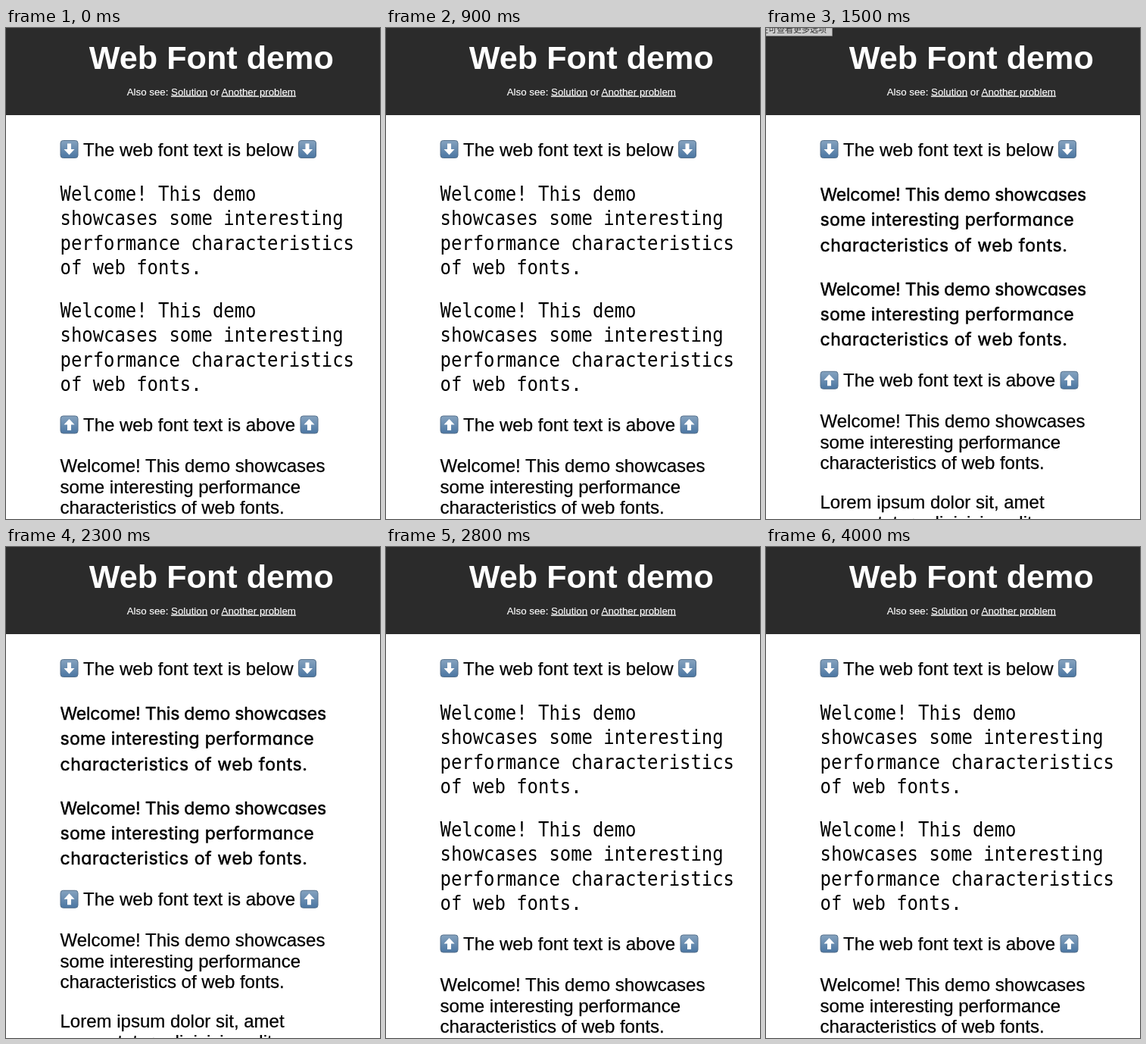
Animation of 494x648 px, one loop 4500 ms. Source, as an HTML page:

```html
<!DOCTYPE html>
<html lang="en">
<head>
<meta charset="utf-8">
<title>Web Font demo</title>
<style>
  html, body { margin: 0; width: 100%; height: 100%; overflow: hidden; background: #fff; }
  svg { display: block; width: 494px; height: 648px; }
  text {
    font: 24px "Liberation Sans", Arial, sans-serif; white-space: pre;
    stroke: #000; stroke-width: .25; stroke-linejoin: round;
  }
  .title { font-size: 43.2px; font-weight: bold; fill: #fff; stroke: none; text-anchor: middle; }
  .links { font-size: 13.3px; fill: #fff; stroke: #fff; stroke-width: .15; text-anchor: middle; }
  .links tspan { text-decoration: underline; }
  .mono text { font: 23.9px "DejaVu Sans Mono", monospace; stroke: none; }
  .hand text { font: 23px Inter, sans-serif; font-feature-settings: "cv11"; stroke-width: .5; }
  .tip text { font: 11px "Noto Sans CJK SC", "Noto Sans CJK", sans-serif; fill: #333; stroke: none; text-anchor: end; }
</style>
</head>
<body>
<svg viewBox="0 0 494 648">
  <defs>
    <linearGradient id="blue" x2="0" y2="1">
      <stop stop-color="#86a3bf"/><stop offset="1" stop-color="#4b76a2"/>
    </linearGradient>
    <rect id="tile" x=".5" y=".5" width="23" height="23" rx="3.5" fill="url(#blue)" stroke="#56718c"/>
    <g id="down"><use href="#tile"/><path d="M9.5 4.5h5v7.5h4.5L12 19.5 5 12h4.5z" fill="#fff"/></g>
    <g id="up"><use href="#tile"/><path d="M9.5 19.5h5V12H19L12 4.5 5 12h4.5z" fill="#fff"/></g>
  </defs>
  <rect width="494" height="115" fill="#2b2b2b"/>
  <text class="title" x="271.3" y="54">Web Font demo</text>
  <text class="links" x="271.3" y="88.5">Also see: <tspan>Solution</tspan> or <tspan>Another problem</tspan></text>
  <use href="#down" x="71.5" y="148"/>
  <text x="102" y="169">The web font text is below</text>
  <use href="#down" x="386" y="148"/>
  <g id="mono" class="mono"></g>
  <g id="hand" class="hand"></g>
  <g id="rest">
    <use href="#up" x="71.5" y="511.5"/>
    <text x="102" y="532">The web font text is above</text>
    <use href="#up" x="388.5" y="511.5"/>
  </g>
  <g id="tip" class="tip">
    <path d="M0 0H87.5V10.5H0z" fill="#cbcbcb" stroke="#8b8b8b" stroke-width=".6"/>
    <text x="80" y="6">住可查看更多选项</text>
  </g>
  <path id="cursor" d="M0 0V14.5L3.3 11.4 5.8 17 8.3 15.9 5.9 10.5H10.4z" fill="#000" stroke="#fff" stroke-width="1"/>
</svg>
<script>
const $ = id => document.getElementById(id);
const LOOP = 4500, TIP_IN = 1300, SWAP_IN = 1500, TIP_OUT = 2300, SWAP_OUT = 2800;
const LEFT = 71.5;

const add = (group, text, x, y, extra = "") =>
  $(group).insertAdjacentHTML("beforeend", `<text x="${x}" y="${y}" ${extra}>${text}</text>`);

const monoLines = ["Welcome! This demo", "showcases some interesting",
  "performance characteristics", "of web fonts."];
for (const top of [227.5, 381.5])
  monoLines.forEach((line, i) =>
    add("mono", line, 0, 0, `transform="translate(${LEFT} ${top + i * 32.5}) scale(1 1.13)"`));

const lines = ["Welcome! This demo showcases", "some interesting performance",
  "characteristics of web fonts."];
const handSpacing = [-0.2, 0.25, 0.55];
for (const top of [228, 352.5])
  lines.forEach((line, i) =>
    add("hand", line, LEFT, top + i * 33.4, `letter-spacing="${handSpacing[i]}"`));

lines.forEach((line, i) => add("rest", line, LEFT, 586 + i * 27.5));
["Lorem ipsum dolor sit, amet", "consectetur adipisicing elit,"]
  .forEach((line, i) => add("rest", line, LEFT, 692.5 + i * 27.5));

const show = (id, on) => $(id).setAttribute("visibility", on ? "visible" : "hidden");
const move = (id, x, y) => $(id).setAttribute("transform", `translate(${x} ${y})`);

function draw() {
  const t = performance.now() % LOOP;
  const swapped = t >= SWAP_IN && t < SWAP_OUT;
  show("mono", !swapped);
  show("hand", swapped);
  move("rest", 0, swapped ? -58.7 : 0);
  show("tip", t >= TIP_IN && t < TIP_OUT);

  // The pointer leaves the toolbar above and settles beside the heading.
  const p = Math.min(1, Math.max(0, (t - TIP_OUT) / 300));
  const ease = 1 - (1 - p) ** 2;
  show("cursor", t >= TIP_OUT && t < SWAP_OUT);
  move("cursor", 40 + 383.5 * ease, -20 + 176 * ease);
  requestAnimationFrame(draw);
}
draw();
</script>
</body>
</html>
```
